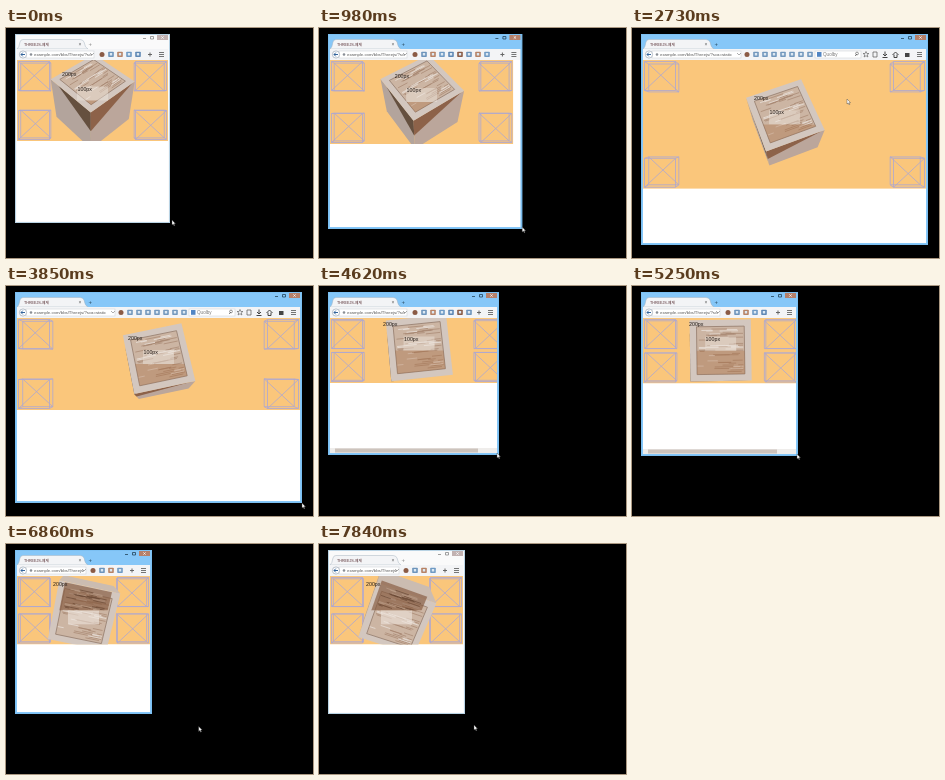
Animation of 307 by 230 pixels, one loop 7910 ms. Source, as an HTML page:

```html
<!DOCTYPE html>
<html lang="ko">
<head>
<meta charset="utf-8">
<style>
html, body { margin: 0; width: 100%; height: 100%; overflow: hidden; background: #000; }
svg { display: block; width: 100vw; height: 100vh; }
text { font-family: "Liberation Sans", "Noto Sans CJK KR", "Noto Sans CJK", sans-serif; }
</style>
</head>
<body>
<svg id="stage" viewBox="0 0 307 230"></svg>
<script>
const LOOP = 7910, STEP = 70;
const stage = document.getElementById('stage');

// Key times with values: [ms, x, y]
const corner = [[0, 164, 195], [560, 164, 195], [770, 166, 197], [1500, 296, 211], [1960, 296, 211],
  [2380, 296, 217], [4200, 296, 217], [4620, 180, 169], [4970, 178, 170], [5040, 178, 170], [5600, 146, 170]];
const pointer = [[0, 166, 192], [560, 166, 192], [770, 167, 195], [1500, 293, 209], [1960, 293, 209],
  [2380, 295, 214], [2730, 215, 71], [3000, 222, 110], [3360, 290, 226], [3850, 296, 217], [4200, 294, 215],
  [4620, 178, 167], [5040, 177, 168], [5600, 145, 168], [5950, 103, 57], [6300, 100, 90],
  [6650, 125, 146], [7100, 270, 224], [7490, 160, 185], [7840, 155, 181]];

function at(keys, t) {
  const i = keys.findIndex(k => k[0] > t);
  if (i < 0) return keys[keys.length - 1].slice(1);
  if (i === 0) return keys[0].slice(1);
  const a = keys[i - 1], b = keys[i], p = (t - a[0]) / (b[0] - a[0]);
  return [a[1] + (b[1] - a[1]) * p, a[2] + (b[2] - a[2]) * p];
}

const n1 = n => n.toFixed(1);
const rect = (x, y, w, h, fill, more = '') =>
  `<rect x="${n1(x)}" y="${n1(y)}" width="${n1(w)}" height="${n1(h)}" fill="${fill}" ${more}/>`;
const label = (x, y, size, fill, s) =>
  `<text x="${n1(x)}" y="${n1(y)}" font-size="${size}" fill="${fill}">${s}</text>`;
const line = (d, color, w = 1) => `<path d="${d}" fill="none" stroke="${color}" stroke-width="${w}"/>`;
const pathOf = pts => 'M' + pts.map(p => n1(p[0]) + ' ' + n1(p[1])).join('L');
const poly = (pts, fill, more = '') => `<path d="${pathOf(pts)}Z" fill="${fill}" ${more}/>`;
const clip = (id, x, y, w, h) => `<clipPath id="${id}">${rect(x, y, w, h, '#000')}</clipPath>`;

function random(seed) {
  return () => (seed = (seed * 16807) % 2147483647) / 2147483647;
}
const rnd = random(417);
const grain = Array.from({ length: 54 }, (_, i) => {
  const u = rnd() * 1.35 - 0.76;
  return { u, v: rnd() * 1.44 - 0.72, end: Math.min(0.74, u + 0.15 + rnd() * 0.5), pale: i % 3 === 0 };
});

function wireBox(x, y, cx, cy) {
  const front = [[x, y], [x + 31, y], [x + 31, y + 29], [x, y + 29]];
  const back = front.map(([px, py]) => [px + (cx - px) * 0.03, py + (cy - py) * 0.04]);
  const d = pathOf(front) + 'Z' + pathOf(back) + 'Z' + pathOf([front[3], front[1]]) +
    pathOf([back[0], back[2]]) + front.map((p, i) => pathOf([p, back[i]])).join('');
  return line(d, '#aca8d2', 0.8);
}

function crate(t, cx, cy) {
  const angle = (5350 - t) / 1000 * 8 * Math.PI / 180;
  const s = Math.sin(angle), c = Math.cos(angle), half = 27.5, eye = 270;
  const project = (u, v, w) => {
    const x = (u * c + v * s) * half, y = (v * c - u * s) * half, z = w * half;
    const k = eye / (eye - y * s - z * c);
    return [cx + x * k, cy + (y * c - z * s) * k];
  };
  const square = (r, w) => [[-r, -r], [r, -r], [r, r], [-r, r]].map(([u, v]) => project(u, v, w));
  const streaks = (w, pale) => grain.filter(g => g.pale === pale)
    .map(g => pathOf([project(g.u, g.v, w), project(g.end, g.v, w)])).join('');
  const front = square(1, 1), back = square(1, -1);
  const tiltedUp = angle > 0;
  let out = '';

  ['#cbbcb1', '#c4b4a9', '#bba69b', '#b3a49c'].forEach((tone, i) => {
    const j = (i + 1) % 4, p = front[i], q = front[j], r = back[j];
    const turn = (q[0] - p[0]) * (r[1] - q[1]) - (q[1] - p[1]) * (r[0] - q[0]);
    if (turn < 0) out += poly([p, q, r, back[i]], tone);
  });
  // The shadow under the lid shows on the two sides that meet at the nearest edge.
  if (tiltedUp) {
    const left = project(-1, -0.6, 1), right = project(0.9, 1, 1);
    const near = project(-1, 1, 0.05), tip = project(-1, 1, 1);
    out += poly([left, near, tip], '#65503f') + poly([tip, near, right], '#8d6249');
  }

  out += poly(front, '#d3c7bf') + poly(square(0.78, 1), '#ccb5a3', 'stroke="#937b6c" stroke-width=".8"');
  out += line(streaks(1, false), '#a68670', 0.7) + line(streaks(1, true), '#e6dcd4', 0.9);
  out += rect(cx - 15.5, tiltedUp ? cy - 14 : cy, 31, 14, '#eee4dc', `opacity="${tiltedUp ? 0.45 : 0.6}"`);

  // One half of the crate, split at the middle of the view, is darker.
  out += clip('half', 0, tiltedUp ? cy : 0, 307, tiltedUp ? 230 : cy) + '<g clip-path="url(#half)">';
  if (tiltedUp) {
    out += poly(square(0.78, 1), '#a5673b', 'opacity=".35"');
  } else {
    out += poly(square(0.86, 0), '#85583c', 'opacity=".65"') +
      line(streaks(0, false), '#6b4a36', 0.7) + line(streaks(0, true), '#c2a58f', 0.6);
  }
  out += '</g>';
  if (tiltedUp) out += label(cx - 15, cy - 10, 5.3, '#221a16', '100px');
  return out;
}

function toolbar(R) {
  const wide = R > 230, urlEnd = wide ? 109 : R > 155 ? 88 : 80;
  const first = wide ? 115 : R > 155 ? 96 : 87;
  const count = wide ? 9 : Math.max(3, Math.round((R - 31 - first) / 9) + 1);
  const url = 'example.com/bbs/Threejs/?sca=static';
  let out = rect(11, 21, R - 13, 11, '#f3f4f6');
  out += clip('url', 22, 21, urlEnd - 24, 11) + rect(20, 23, urlEnd - 20, 7, '#fff', 'stroke="#c9cdd2" stroke-width=".5"');
  out += '<circle cx="17" cy="26.5" r="3.6" fill="#fff" stroke="#8d9aaa" stroke-width=".6"/>' +
    line('M19 26.5H15M16.8 24.6L15 26.5L16.8 28.4', '#35659c', 1);
  out += `<g clip-path="url(#url)">${label(28, 28.2, 4.3, '#555', url)}</g><circle cx="25" cy="26.5" r="1.3" fill="#8a8f96"/>`;
  out += line(`M${urlEnd - 4} 25l2 2l2 -2`, '#777', 0.6);
  const tints = ['#8b5b45', '#6d94bb', '#b78366', '#6f9ac4', '#5f88b4'];
  for (let i = 0; i < count; i++) {
    const x = first + i * 9;
    out += i ? rect(x - 2.8, 23.8, 5.6, 5.2, wide ? '#7398bd' : tints[i % 5], 'rx=".8"') +
      rect(x - 1.2, 25, 2.4, 2.5, '#dce8f2') : `<circle cx="${x}" cy="26.5" r="2.5" fill="${tints[0]}"/>`;
  }
  if (wide) {
    out += rect(183, 23, 46, 7, '#fff', 'stroke="#c9cdd2" stroke-width=".5"') + rect(185, 24, 4.5, 4.8, '#5286c4') +
      label(191, 28.2, 4.6, '#777', 'Quolby') + line('M223 28l2 -2', '#555', 0.7) +
      '<circle cx="225" cy="25.5" r="1.4" fill="none" stroke="#555" stroke-width=".6"/>';
    out += line('M234 23.5l.9 2h2l-1.6 1.3l.6 2.2l-1.9 -1.3l-1.9 1.3l.6 -2.2l-1.6 -1.3h2Z', '#555', 0.6) +
      line('M241 24h4v5h-4Z', '#555', 0.7) + line('M253 23.5v4M251 26l2 2l2 -2M250.5 29.5h5', '#444', 1) +
      line('M260.5 27l3 -3l3 3M262 26.5v3h3v-3', '#444', 1) + rect(273, 25, 4.5, 4, '#444');
  } else {
    out += line(`M${n1(R - 22)} 26.5h4M${n1(R - 20)} 24.5v4`, '#666', 1);
  }
  return out + line([24.5, 26.5, 28.5].map(y => `M${n1(R - 11)} ${y}h5`).join(''), '#555', 0.8);
}

function frame(R, B, active) {
  const blue = '#86c7f8', ink = active ? '#24455a' : '#888';
  let out = rect(9.5, 6.5, R - 10, B - 7, active ? blue : '#fafafa',
    `stroke="${active ? '#7cc0f2' : '#b9d3e4'}" stroke-width="1"`);
  out += rect(11, 32, R - 13, B - 34, '#fff');
  out += '<path d="M11 21Q13 20 14 14Q14.5 11.5 17 11.5H74Q77 11.5 78 14Q79 20 82 21Z" ' +
    'fill="#f3f4f6" stroke="#a6b5c0" stroke-width=".5"/>';
  out += label(18, 17.6, 3.7, '#552c31', 'THREEJS-예제') + label(72.5, 18, 5, '#555', '×') + label(82.5, 18, 6, ink, '+');
  out += line(`M${n1(R - 27)} 10.5h3M${n1(R - 19.5)} 8.5h3v2.5h-3Z`, ink, 0.8);
  out += rect(R - 13, 7, 11, 5, active ? '#b5806a' : '#c2b2b1') +
    line(`M${n1(R - 8.7)} 8.3l2.4 2.4m0 -2.4l-2.4 2.4`, '#fff', 0.7);
  return out + toolbar(R);
}

function draw(t) {
  const [R, B] = at(corner, t);
  const right = at(corner, Math.max(0, t - 40))[0] - 2;
  const scrolls = right > R;
  const hovered = (t >= 2590 && t < 3220) || (t >= 5840 && t < 6720);
  const height = (B - 33 - (scrolls ? 6 : 0)) * (hovered ? 0.7 : 0.5);
  const bottom = 32 + height, cx = (11 + right) / 2, cy = 32 + height / 2;
  const mid = (9 + R) / 2;
  const active = t >= 420 && t < 7600;

  let out = rect(0, 0, 307, 230, '#000') + frame(R, B, active);
  out += clip('view', 11, 32, Math.min(right, R - 2) - 11, height) + '<g clip-path="url(#view)">';
  out += rect(11, 32, right - 11, height, '#fac67b');
  for (const x of [12.5, right - 32.5])
    for (const y of [33.5, bottom - 30.5]) out += wireBox(x, y, cx, cy);
  out += crate(t, cx, cy) + label(mid - 30.5, cy - 24.5, 5.3, '#221a16', '200px') + '</g>';
  if (scrolls) out += rect(11, B - 7, R - 13, 5, '#efedeb') + rect(16, B - 6.5, R - 37, 4, '#cdc4bd');

  const [px, py] = at(pointer, t);
  out += `<path transform="translate(${n1(px)} ${n1(py)})" d="M0 0V5L1.2 4L2 5.8L2.8 5.4L2 3.7H3.5Z" ` +
    'fill="#fff" stroke="#333" stroke-width=".4"/>';
  stage.innerHTML = out;
}

const start = performance.now();
let shown = -1;
function tick() {
  const t = Math.floor((performance.now() - start) % LOOP / STEP) * STEP;
  if (t !== shown) draw(shown = t);
  requestAnimationFrame(tick);
}
tick();
</script>
</body>
</html>
```
